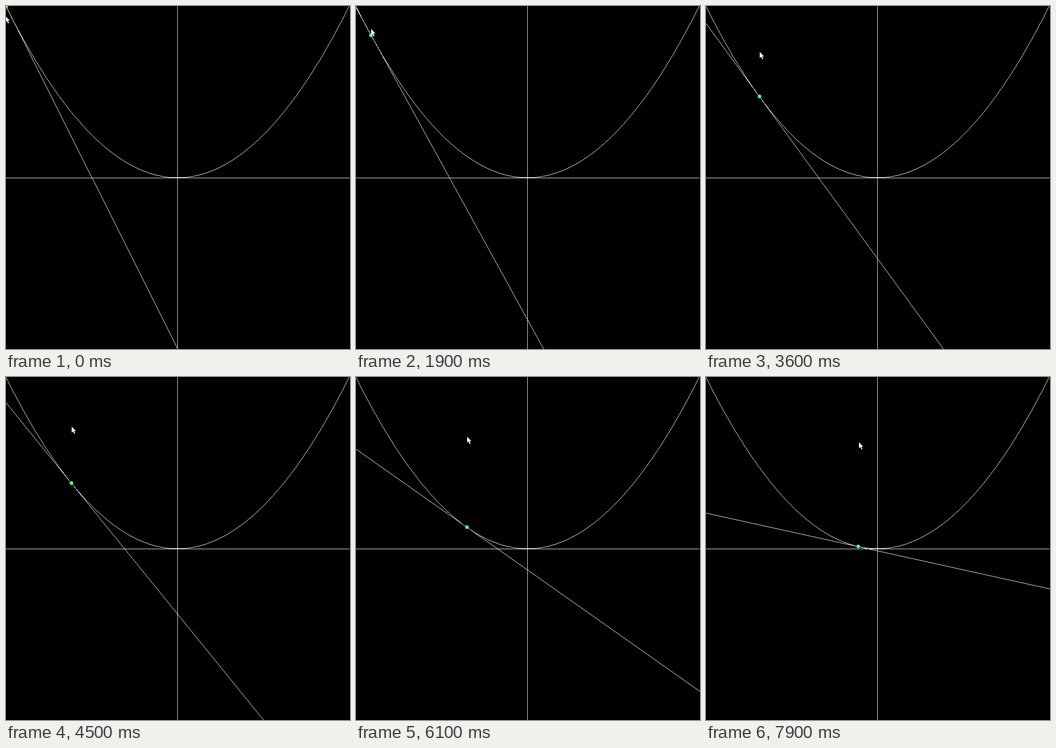
These frames come from a looping animation (749 by 747 pixels, 8 s). A matplotlib script:

```python
import numpy as np
import matplotlib.pyplot as plt
from matplotlib.animation import FuncAnimation
from matplotlib.patches import Circle, Polygon

W, H = 749, 747
DPI = 64                 # power of two keeps the pixel size exact
CX, CY, SCALE = 373, 374, 374
FRAMES, INTERVAL = 80, 100

# Stretches of the drag: first frame, last frame, start x, end x, easing
DRAGS = [
    (8, 24, 0, 53, lambda u: u ** 1.28),
    (26, 38, 53, 135.5, lambda u: u + 0.075 * np.sin(2 * np.pi * u)),
    (38, 45, 135.5, 142.4, lambda u: u),
    (45, 79, 142.4, 331.6, lambda u: u * (1.21 - 0.21 * u)),
]
# The drag stutters: nothing moves in these frames.
RESTS = {25, 26, 39, *range(41, 45),
         *range(46, 53, 3), *range(54, 61, 3), *range(62, FRAMES, 3)}

# The pointer's path, and its shape relative to the tip
PATH_X, PATH_Y = (-1, 34, 81, 144, 230, 332), (26, 50, 88, 108, 128, 142)
ARROW = np.array([(0, 0), (0, 13), (3, 10.5), (5.5, 16), (7.6, 15), (5.2, 10), (9, 9.7)])


def point_x(frame):
    while frame in RESTS:
        frame -= 1
    for first, last, start, end, ease in DRAGS:
        if frame <= last:
            break
    u = np.clip((frame - first) / (last - first), 0, 1)
    return start + (end - start) * ease(u)


def pointer_tip(frame, x):
    tip_x = x + np.clip(x / 20 - 1, -1, 1)
    tip_y = np.interp(tip_x, PATH_X, PATH_Y)
    if frame < 8:
        tip_y -= 4 * (1 - np.clip((frame - 4) / 3, 0, 1))
    return np.round([tip_x, tip_y])


def parabola(x):
    return CY - (x - CX) ** 2 / SCALE


def tangent(x, x0):
    return parabola(x0) - 2 * (x0 - CX) / SCALE * (x - x0)


def draw_line(canvas, x0, y0, x1, y1):
    """Set one pixel per step along the longer side, without smoothing."""
    x0, y0, x1, y1 = (int(np.floor(v)) for v in (x0, y0, x1, y1))
    steps = max(abs(x1 - x0), abs(y1 - y0)) + 1
    x = np.linspace(x0, x1, steps).round().astype(int)
    y = np.linspace(y0, y1, steps).round().astype(int)
    inside = (x >= 0) & (x < W) & (y >= 0) & (y < H)
    canvas[y[inside], x[inside]] = 1


graph = np.zeros((H, W))
draw_line(graph, 0, CY, W - 2, CY)
draw_line(graph, CX, 0, CX, H - 1)
for x in range(W - 2):
    draw_line(graph, x, parabola(x), x + 1, parabola(x + 1))

fig = plt.figure(figsize=(W / DPI, H / DPI), dpi=DPI, facecolor="black")
ax = fig.add_axes([0, 0, 1, 1])
image = ax.imshow(graph, cmap="gray", vmin=0, vmax=1, interpolation="nearest",
                  extent=(0, W, H, 0), aspect="auto")
ax.set(xlim=(0, W), ylim=(H, 0))
ax.axis("off")
dot = ax.add_patch(Circle((0, 0), 4, fc="#5cff7c", ec="none", zorder=3))
arrow = ax.add_patch(Polygon(ARROW, fc="white", ec="none", snap=False, zorder=4))


def update(frame):
    x = point_x(frame)
    canvas = graph.copy()
    draw_line(canvas, 0, tangent(0, x), W - 1, tangent(W - 1, x))
    image.set_data(canvas)
    dot.center = (np.floor(x) + 0.5, np.floor(parabola(x)))
    arrow.set_xy(ARROW + pointer_tip(frame, x))
    return image, dot, arrow


anim = FuncAnimation(fig, update, frames=FRAMES, interval=INTERVAL,
                     repeat=True, repeat_delay=0, blit=False)
plt.show()
```
